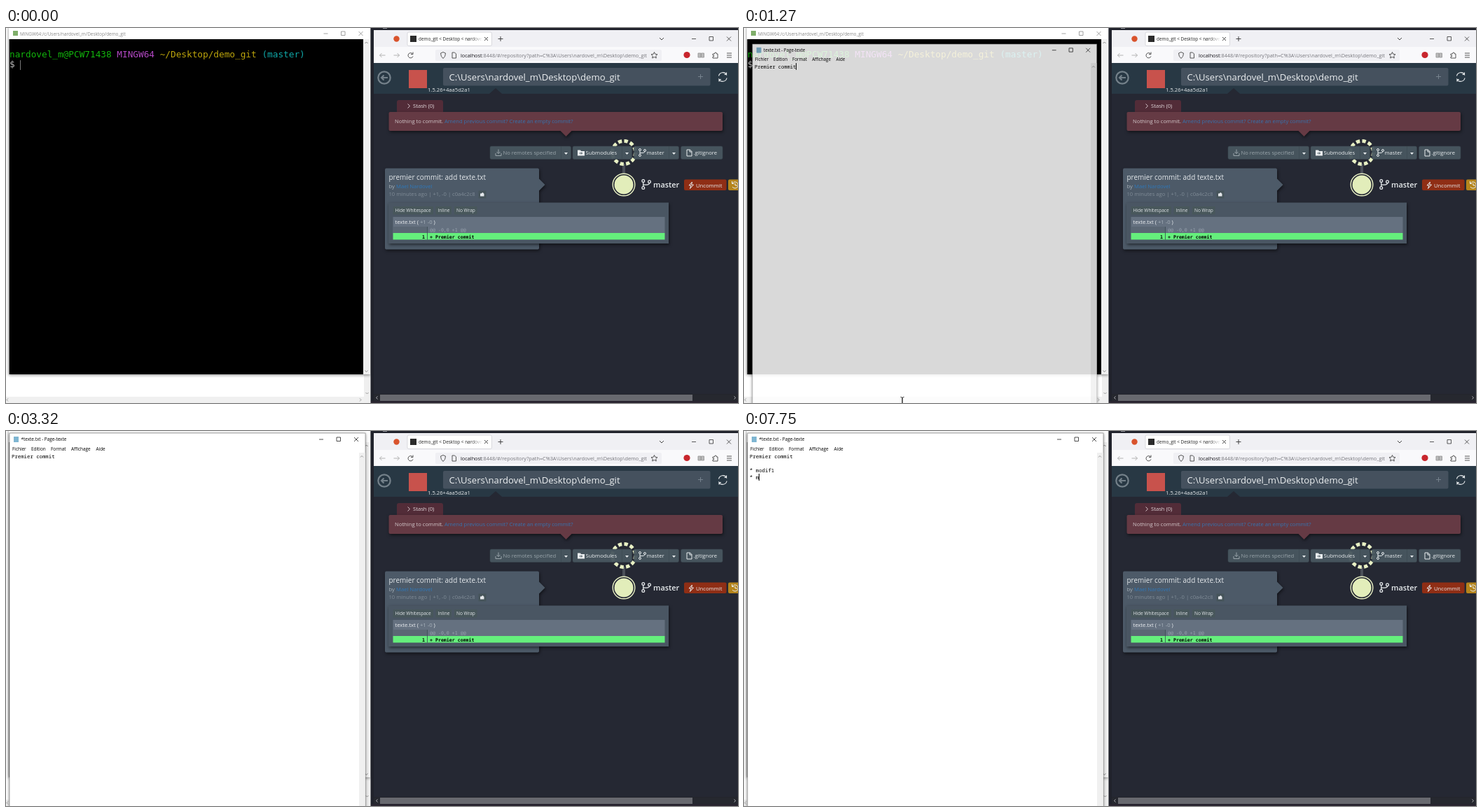
An HTML page for the animation above (8 s loop, 1045 by 536 pixels).

```html
<!DOCTYPE html>
<html lang="fr">
<head>
<meta charset="utf-8">
<title>demo_git</title>
<style>
  html, body { margin: 0; width: 100%; height: 100%; overflow: hidden; background: #fff; }
  svg { display: block; width: 1045px; height: 536px; }
  text { font: 7.65px "Open Sans", "Noto Sans", sans-serif; white-space: pre; }
  .ui text, text.ui { font-size: 6.4px; }
  .term text { font: 12.74px "DejaVu Sans Mono", monospace; }
  .edit text { font: 7.33px "Noto Sans Mono", "DejaVu Sans Mono", monospace; }
  .diff text { font: 6.6px "DejaVu Sans Mono", monospace; }
  .line { fill: none; stroke: currentColor; }
  .small text { font-size: 6.55px; }
  .soft { filter: drop-shadow(1px 2px 2px #0008); }
  .win { filter: drop-shadow(0 1px 2px #0007); }
</style>
</head>
<body>
<svg viewBox="0 0 1045 536">
  <defs>
    <g id="controls" class="line" stroke-width=".8">
      <path d="M-3 0h6M22-3h5.500v5.500h-5.500zM47-3l6 6m0-6l-6 6"/>
    </g>
    <g id="branch" class="line" stroke-width="1">
      <circle cx="-3" cy="-4" r="1.500"/><circle cx="-3" cy="4" r="1.500"/><circle cx="4" cy="-3" r="1.500"/>
      <path d="M-3-2.500v5M4-1.500q0 2.500-7 2"/>
    </g>
    <path id="down" d="M-2.500-1h5l-2.500 3z"/>
    <path id="arrowUp" class="line" d="M-2 1l2-2 2 2"/>
    <linearGradient id="fade" gradientUnits="userSpaceOnUse" x1="664" x2="680" y1="0" y2="0">
      <stop stop-color="#222"/><stop offset="1" stop-color="#222" stop-opacity="0"/>
    </linearGradient>
    <clipPath id="tabClip"><rect x="588" y="6" width="92" height="20"/></clipPath>
  </defs>

  <!-- background editor -->
  <rect width="521" height="536" fill="#fff"/>
  <rect y="527" width="511" height="9" fill="#f0f0f0"/>
  <rect x="511" width="10" height="536" fill="#efefef"/>
  <g color="#999"><use href="#arrowUp" transform="translate(515.500 522) rotate(180)"/>
    <use href="#arrowUp" transform="translate(2 531.500) rotate(-90)"/>
    <use href="#arrowUp" transform="translate(506 531.500) rotate(90)"/></g>

  <!-- terminal -->
  <g class="win">
    <rect x="4" y="-2" width="516" height="497" fill="#fff"/>
    <rect x="4.500" y="16" width="506" height="479" fill="#000"/>
    <rect x="510" y="16" width="9.500" height="479" fill="#f0f0f0"/>
  </g>
  <g color="#888"><use href="#controls" x="456.500" y="8"/>
    <use href="#arrowUp" x="514.500" y="21"/>
    <use href="#arrowUp" transform="translate(514.500 490.500) rotate(180)"/></g>
  <rect x="10" y="4" width="7" height="7" fill="#7fae6a"/>
  <text class="ui" x="20" y="10.500" fill="#888">MINGW64:/c/Users/nardovel_m/Desktop/demo_git</text>
  <g class="term">
    <text x="5" y="42.300" fill="#12b50c">nardovel_m@PCW71438 <tspan fill="#b348c4">MINGW64</tspan> <tspan fill="#bfa70c">~/Desktop/demo_git</tspan> <tspan fill="#0fa9a9">(master)</tspan></text>
    <text x="5" y="56.300" fill="#bfbfbf">$</text>
    <rect x="20" y="46" width="1" height="14" fill="#777"/>
  </g>

  <!-- browser -->
  <rect x="520.500" width="525" height="536" fill="#20222b"/>
  <rect x="525" y="3" width="520" height="24" fill="#f0f0f4"/>
  <rect x="525" y="27" width="520" height="23" fill="#f9f9fb"/>
  <rect x="538" y="0" width="6" height="1" fill="#8d8f96"/>
  <circle cx="557.500" cy="15.500" r="4.200" fill="#d9532c"/>
  <rect x="573" y="6" width="120.500" height="19.500" rx="2" fill="#fff" stroke="#c4c4cc" stroke-width=".6"/>
  <rect x="577" y="11" width="9" height="9" fill="#2b2b2b"/>
  <g class="ui" clip-path="url(#tabClip)"><text x="589" y="17.800" fill="url(#fade)">demo_git &lt; Desktop &lt; nardovel_m</text></g>
  <g color="#333">
    <path class="line" stroke-width=".9" d="M683 13l5 5m0-5l-5 5M702.500 15.500h7m-3.500-3.500v7M933 14l3 3 3-3"/>
    <use href="#controls" x="982" y="15.500"/>
  </g>
  <rect x="613" y="31" width="323" height="16" rx="2" fill="#f0f0f4"/>
  <g class="line" stroke-width=".9" color="#444">
    <path color="#aaa" d="M541.500 39h-8m3-3l-3 3 3 3M553.500 39h8m-3-3l3 3-3 3"/>
    <path d="M580.500 37a3.600 3.600 0 1 0 .5 3.500M581 34.500v3h-3"/>
    <path d="M624 34.500l3.500 1.500q0 5-3.500 7.500-3.500-2.500-3.500-7.500zM637 35h3.500l2 2v6h-5.500z"/>
    <path d="M925.500 34.500l1.300 2.800 3.200.4-2.300 2.200.6 3.100-2.800-1.500-2.800 1.500.6-3.100-2.300-2.200 3.200-.4z"/>
    <path d="M1029 36h7m-7 3h7m-7 3h7M1009 37h2.500q0-2 1.500-2t1.500 2h1.500v6h-7v-2q2 0 2-1t-2-1z"/>
    <path color="#999" fill="#bbb" d="M988 36h4v6h-4zm4.500 0h4v6h-4z"/>
  </g>
  <circle cx="972" cy="38.500" r="4.600" fill="#c8262d"/>
  <text x="649" y="41.700" style="font-size:7.300px" fill="#77777d"><tspan fill="#15141a">localhost</tspan>:8448/#/repository?path=C%3A\Users\nardovel_m\Desktop\demo_git</text>

  <!-- page -->
  <rect x="525" y="50" width="520" height="473" fill="#252833"/>
  <rect x="525" y="50" width="520" height="44" fill="#283844"/>
  <path d="M690 94l9-8 9 8z" fill="#252833"/>
  <g class="line" color="#74818a" stroke-width="2.200">
    <circle cx="540" cy="71" r="8.700"/>
    <path d="M545 71h-9m3.500-3.500l-3.500 3.500 3.500 3.500"/>
  </g>
  <rect x="575" y="60" width="26" height="26" fill="#c8524c"/>
  <text x="602" y="91.200" fill="#e8ebed">1.5.26+4aa5d2a1</text>
  <rect x="624" y="57" width="381.500" height="25.500" rx="2" fill="#45515e"/>
  <text x="632.500" y="74.700" style="font-size:13.100px" fill="#eceff1">C:\Users\nardovel_m\Desktop\demo_git</text>
  <path class="line" color="#76828d" d="M988 69.500h7m-3.500-3.500v7"/>
  <path class="line" color="#e6e9eb" stroke-width="1.200" d="M1017.500 68.500a6 6 0 0 1 11-2v-3m0 3h-3M1029 71.500a6 6 0 0 1-11 2v3m0-3h3"/>

  <path d="M558 120v-14q0-3 3-3h60q3 0 3 3v14z" fill="#522c38"/>
  <path class="line" color="#d8c9cd" d="M573.500 108.500l3 3-3 3"/>
  <text x="581" y="114.200" fill="#e3dadd">Stash (0)</text>
  <g class="soft" fill="#653a44"><rect x="546.500" y="120" width="476.500" height="27" rx="2"/><path d="M791 146.500h17l-8.500 8.500z"/></g>
  <text x="555" y="136.200" fill="#d3c8cb">Nothing to commit. <tspan fill="#3574b0">Amend previous commit? Create an empty commit?</tspan></text>

  <path d="M882 194v14" stroke="#4a4f58" stroke-width="4"/>
  <circle cx="882" cy="178" r="16.500" fill="none" stroke="#e8f0c4" stroke-width="5" stroke-dasharray="5.300 3.340"/>
  <g fill="#48575f" fill-opacity=".95" stroke="#39464f" stroke-width=".5">
    <rect x="691" y="169" width="115.500" height="18.500" rx="2"/>
    <rect x="809" y="169" width="84.500" height="18.500" rx="2"/>
    <rect x="896.500" y="169" width="64" height="18.500" rx="2"/>
    <rect x="963.500" y="169" width="59.500" height="18.500" rx="2"/>
    <path d="M792.500 169v18.500M879.500 169v18.500M946.500 169v18.500"/>
  </g>
  <g fill="#e9edef" color="#e9edef">
    <use href="#down" x="799.500" y="179"/><use href="#down" x="886.500" y="179"/><use href="#down" x="953.500" y="179"/>
    <path class="line" color="#9aa5ab" d="M703 173.500v6m-2.500-2.500l2.500 2.500 2.500-2.500M699 179v3.500h8v-3.500"/>
    <text x="709.500" y="181.300" fill="#9aa5ab">No remotes specified</text>
    <path d="M816 174.500h4l1 1.500h5v6.500h-10z"/>
    <path d="M818.500 179h4m-1.500-1.500l1.500 1.500-1.500 1.500" fill="none" stroke="#48575f"/>
    <text x="827.500" y="181.300">Submodules</text>
    <use href="#branch" x="908" y="178"/><text x="914.500" y="181.300">master</text>
    <path class="line" d="M972 174h4.500l2.500 2.500v6.500h-7zM976 174v3h3"/><text x="981.500" y="181.300">.gitignore</text>
    <circle cx="882" cy="224" r="15.800" fill="#252833" stroke="#e8f0c4" stroke-width="1.400"/>
    <circle cx="882" cy="224" r="13.500" fill="#e2edba"/>
    <use href="#branch" transform="translate(913.500 223.500) scale(1.250)"/>
    <text x="924" y="227.800" style="font-size:10.900px;font-weight:600">master</text>
    <rect x="968" y="216.500" width="60.500" height="15.500" rx="2" fill="#8f2e15"/>
    <path class="line" d="M979.500 220l-4.500 5h3l-1.500 4.500 5-5.500h-3z"/>
    <text x="985" y="227.500">Uncommit</text>
    <rect x="1031" y="216.500" width="20" height="15.500" rx="2" fill="#b5851c"/>
    <path class="line" d="M1037 222a4.500 4.500 0 1 1 0 5M1036.500 219v3.500h3M1041 222v3h3"/>
  </g>

  <!-- commit -->
  <g class="soft" fill="#4d5a68"><rect x="541" y="200.500" width="220" height="116" rx="2"/><path d="M760.500 215l9 9-9 9z"/></g>
  <text x="546.500" y="216.700" style="font-size:9.960px" fill="#e4e8eb">premier commit: add texte.txt</text>
  <text x="546.500" y="228.700" fill="#a5afb8">by <tspan x="557" fill="#2f78ba">Mael Nardovel</tspan></text>
  <text x="546.500" y="240" fill="#808c97">10 minutes ago | +1, -0 | c0a4c2c8</text>
  <rect x="674.500" y="232.500" width="11" height="11" rx="1" fill="#46545a"/>
  <path d="M677 240.500v-4h1.500l2-1.500 2 2v3.500z" fill="#e4e8eb"/>
  <rect class="soft" x="546" y="249.500" width="400" height="58.500" fill="#4a5663"/>
  <g class="small" fill="#e1e5e8">
    <g fill="#48575b"><rect x="552.500" y="255" width="57.500" height="11.500" rx="1"/><rect x="613.500" y="255" width="22.500" height="11.500" rx="1"/><rect x="640" y="255" width="32.500" height="11.500" rx="1"/></g>
    <text x="555.500" y="263">Hide Whitespace</text><text x="616.500" y="263">Inline</text><text x="643" y="263">No Wrap</text>
  </g>
  <rect x="552.500" y="270" width="388" height="23" fill="#657180"/>
  <rect x="552.500" y="284" width="49" height="9" fill="#5b6774"/>
  <rect x="552.500" y="293" width="388" height="9.500" fill="#65ef7c"/>
  <path d="M601.500 284v18.500" stroke="#3c4b52" stroke-width=".8"/>
  <text x="555.500" y="279.500" fill="#eceff1">texte.txt ( <tspan fill="#a9b3bc">+1 -0</tspan> )</text>
  <g class="diff">
    <text x="605" y="291" fill="#98a3ae">@@ -0,0 +1 @@</text>
    <g font-weight="700" style="font-weight:700"><text x="594" y="300.500" style="font-weight:700">1</text><text x="605" y="300.500" style="font-weight:700">+ Premier commit</text></g>
  </g>
  <rect x="525" y="523.500" width="520" height="10" fill="#26282f"/>
  <rect x="534" y="524" width="446" height="9" fill="#68696f"/>
  <g color="#b5b6ba"><use href="#arrowUp" transform="translate(529.500 528.500) rotate(-90)"/>
    <use href="#arrowUp" transform="translate(1040.500 528.500) rotate(90)"/></g>
  <rect x="521" y="533.500" width="524" height="2.500" fill="#2a2530"/>

  <!-- taskbar preview -->
  <g id="preview" class="ui">
    <rect id="previewBox" x="125" y="471" width="137" height="66" fill="#2a2d33"/>
    <rect x="130" y="477" width="7" height="7" fill="#7fb6d2"/>
    <text x="140" y="483" fill="#fff">texte.txt - Page-texte</text>
    <rect x="160" y="490" width="67" height="50" fill="#fff"/>
  </g>

  <!-- text editor -->
  <g id="notepad">
    <rect class="win" x="5" y="3" width="508" height="590" fill="#fff" stroke="#777" stroke-width=".6"/>
    <rect x="504" y="31" width="8.700" height="560" fill="#f0f0f0"/>
    <use href="#arrowUp" x="508" y="36.500" color="#999"/>
    <rect x="11" y="8" width="7" height="8" fill="#7fb6d2"/>
    <use href="#controls" x="450" y="12" color="#222"/>
    <g class="ui">
      <text id="title" x="21.500" y="14.300"></text>
      <text x="9" y="28.300">Fichier</text><text x="36" y="28.300">Edition</text><text x="64" y="28.300">Format</text>
      <text x="93" y="28.300">Affichage</text><text x="128.500" y="28.300">Aide</text>
    </g>
    <g class="edit" id="lines">
      <text x="8" y="39.200"></text><text x="8" y="49.100"></text><text x="8" y="59"></text><text x="8" y="68.900"></text>
    </g>
    <rect id="caret" width="1" height="10"/>
  </g>
  <path id="pointer" class="line" color="#222" stroke-width=".9" d="M-2.500-5.500q2.500 0 2.500 1.500v8.500q0 1.500-2.500 1.500M2.500-5.500q-2.500 0-2.500 1.500v8.500q0 1.500 2.500 1.500"/>
</svg>
<script>
const LOOP = 8000, BLINK = 510;
const $ = id => document.getElementById(id);
const lines = $("lines").children;

// keystrokes in the text editor: [time, characters]
const keys = [[1230, "Premier commit"], [2510, "\n"], [2810, "\n"], [3520, "*"], [4290, " "], [4610, "m"],
  [4860, "o"], [5060, "d"], [5230, "i"], [5330, "f"], [6100, "1"], [6540, "\n"],
  [7250, "*"], [7470, " "], [7750, "m"]];

// opening window: [time, left, top, scale, opacity]
const opening = [[1220, 27, 69.5, .9, .52], [1270, 12, 23, .968, .85], [1320, 7, 7, .992, .96], [1370, 5, 3, 1, 1]];

// pointer path: [time, x, y]
const path = [[1070, 226, 533], [1620, 226, 533], [2390, 183, 216], [2460, 183, 216],
  [2610, 186, 217], [2810, 186, 217], [3010, 188, 218]];

// preview opacity: [time, value]
const previewFade = [[500, .25], [550, .55], [600, .85], [650, 1], [1000, .5], [1070, 0]];

const latest = (list, t) => list.filter(step => step[0] <= t).pop();
const show = (node, on) => node.setAttribute("visibility", on ? "inherit" : "hidden");

function drawPreview(t) {
  $("preview").setAttribute("opacity", (latest(previewFade, t) || [0, 0])[1]);
  $("previewBox").setAttribute("fill", t < 850 ? "#2a2d33" : "#43474e");
}

function drawNotepad(t) {
  const pose = latest(opening, t);
  $("notepad").setAttribute("visibility", pose ? "visible" : "hidden");
  if (!pose) return;
  const [, x, y, scale, opacity] = pose;
  $("notepad").setAttribute("transform", `translate(${x} ${y}) scale(${scale}) translate(-5 -3)`);
  $("notepad").setAttribute("opacity", opacity);

  const typed = keys.filter((key, i) => i === 0 || key[0] <= t);
  const rows = typed.map(key => key[1]).join("").split("\n");
  for (let i = 0; i < lines.length; i++) lines[i].textContent = rows[i] || "";
  $("title").textContent = (typed.length > 1 ? "*" : "") + "texte.txt - Page-texte";

  const idle = Math.max(0, t - typed[typed.length - 1][0]);
  show($("caret"), Math.floor(idle / BLINK) % 2 === 0);
  $("caret").setAttribute("x", Math.round(7.4 + 4.4 * rows[rows.length - 1].length));
  $("caret").setAttribute("y", 31 + 10 * (rows.length - 1));
}

function drawPointer(t) {
  const next = path.findIndex(point => point[0] > t);
  show($("pointer"), next > 0);
  if (next < 1) return;
  const [t0, x0, y0] = path[next - 1], [t1, x1, y1] = path[next];
  const k = (1 - Math.cos(Math.PI * (t - t0) / (t1 - t0))) / 2;
  $("pointer").setAttribute("transform", `translate(${x0 + (x1 - x0) * k} ${y0 + (y1 - y0) * k})`);
}

const start = performance.now();
function frame() {
  const t = (performance.now() - start) % LOOP;
  drawPreview(t);
  drawNotepad(t);
  drawPointer(t);
  requestAnimationFrame(frame);
}
frame();
</script>
</body>
</html>
```
